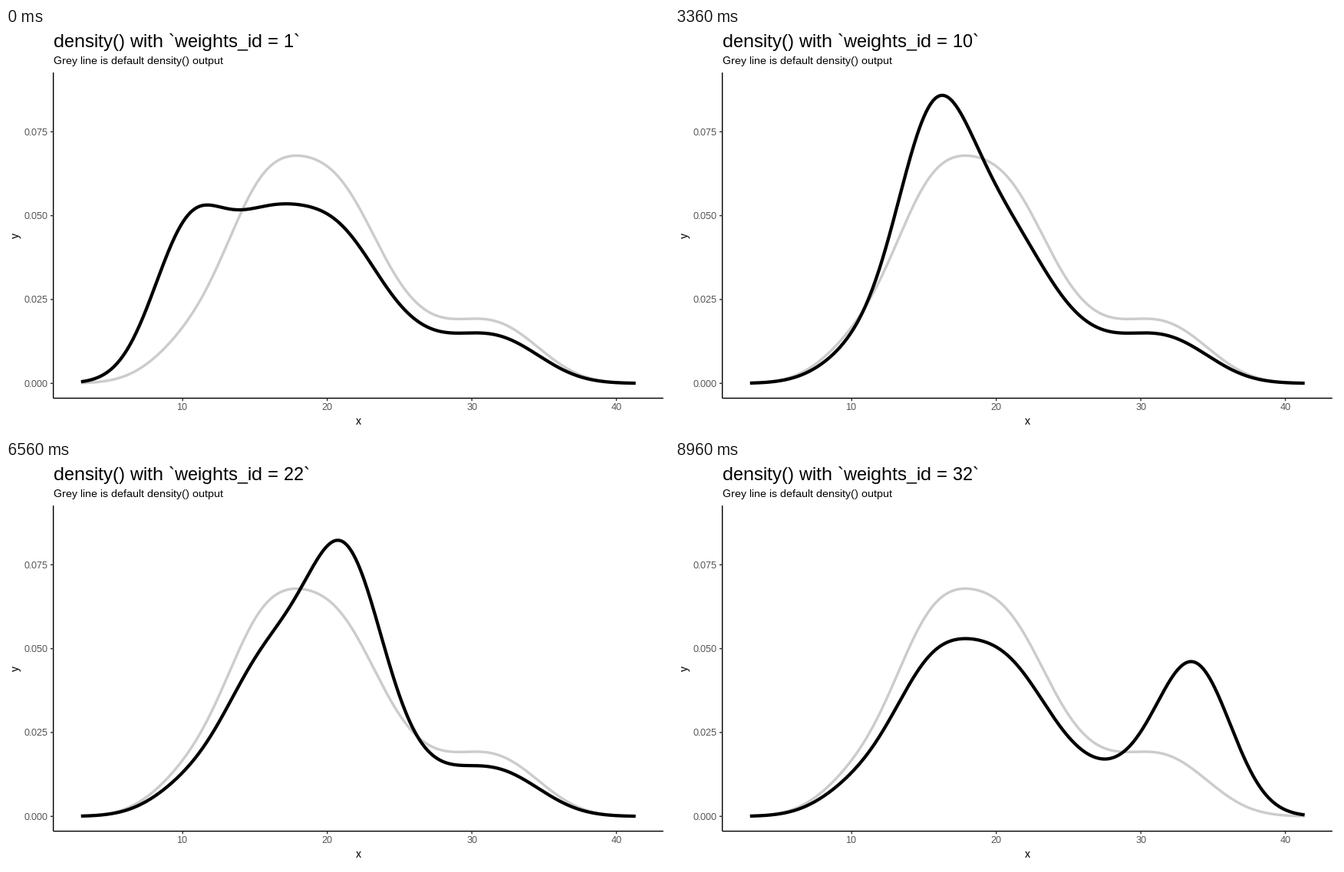
Animation, 864 px wide and 528 px high, one loop 9.6 s. Source, as a matplotlib script:

```python
import numpy as np
import matplotlib.pyplot as plt
from matplotlib.animation import FuncAnimation

W, H, DPI = 864, 528, 96
FRAMES, INTERVAL = 120, 80

# Whole-pixel letter spacing
plt.rcParams["font.family"] = "Liberation Sans"
plt.rcParams["text.hinting"] = "native"
plt.rcParams["text.hinting_factor"] = 1

# Panel edges in pixels, measured from the top left corner
LEFT, RIGHT, TOP, BOTTOM = 61.67, 856.67, 58.1, 482.6
Y_ZERO, Y_UNIT = 463.3, 4373

VALUES = np.array([
    10.4, 10.4, 13.3, 14.3, 14.7, 15.0, 15.2, 15.2, 15.5, 15.8, 16.4,
    17.3, 17.8, 18.1, 18.7, 19.2, 19.2, 19.7, 21.0, 21.0, 21.4, 21.4,
    21.5, 22.8, 22.8, 24.4, 26.0, 27.3, 30.4, 30.4, 32.4, 33.9])
COUNT = len(VALUES)
HEAVY = 10

# Rule-of-thumb bandwidth
q1, q3 = np.percentile(VALUES, [25, 75])
BW = 0.9 * min(VALUES.std(ddof=1), (q3 - q1) / 1.34) * COUNT ** -0.2

GRID = np.linspace(VALUES[0] - 3 * BW, VALUES[-1] + 3 * BW, 512)
KERNELS = np.exp(-0.5 * ((GRID[:, None] - VALUES) / BW) ** 2)
KERNELS /= BW * np.sqrt(2 * np.pi)

PAD = 0.05 * (GRID[-1] - GRID[0])
X_UNIT = (RIGHT - LEFT) / (GRID[-1] - GRID[0] + 2 * PAD)


def to_x(v):
    return LEFT + (v - GRID[0] + PAD) * X_UNIT


def to_y(v):
    return Y_ZERO - v * Y_UNIT


def pt(px):
    return px * 72 / DPI


def density(heavy_id=None):
    weights = np.ones(COUNT)
    if heavy_id:
        weights[heavy_id - 1] = HEAVY
    return KERNELS @ weights / weights.sum()


def switch(k):
    """Frame at which the title moves on to state k."""
    return min(4 * k + 2, 3 * k + 16)


def state_at(frame):
    return 1 + sum(switch(k) <= frame for k in range(2, COUNT + 1))


fig = plt.figure(figsize=(W / DPI, H / DPI), dpi=DPI, facecolor="white")
ax = fig.add_axes([0, 0, 1, 1])
ax.set_xlim(0, W)
ax.set_ylim(H, 0)
ax.axis("off")


def stroke(xs, ys, color, px):
    return ax.plot(xs, ys, color=color, lw=pt(px), solid_capstyle="butt",
                   solid_joinstyle="round", snap=False)[0]


def label(x, y, text, px, color="black", **kw):
    return ax.text(x, y, text, fontsize=pt(px), color=color,
                   va="baseline", **kw)


curve_x = to_x(GRID)
stroke(curve_x, to_y(density()), "#cccccc", 3.41)
curve = stroke(curve_x, to_y(density(1)), "black", 4.27)

# Axis lines, ticks and tick labels
THIN, TICK = 1.42, 3.67
stroke([LEFT, LEFT], [TOP, BOTTOM], "black", THIN)
stroke([LEFT, RIGHT], [BOTTOM, BOTTOM], "black", THIN)
for v in (0, 0.025, 0.05, 0.075):
    y = to_y(v)
    stroke([LEFT - TICK, LEFT], [y, y], "#333333", THIN)
    label(55, y + 4.3, f"{v:.3f}", 12, "#4d4d4d", ha="right")
for v in (10, 20, 30, 40):
    x = to_x(v)
    stroke([x, x], [BOTTOM, BOTTOM + TICK], "#333333", THIN)
    label(x, 498, str(v), 12, "#4d4d4d", ha="center")

label((LEFT + RIGHT) / 2, 517, "x", 14.67, ha="center")
label(17, (TOP + BOTTOM) / 2, "y", 14.67, ha="center",
      rotation=90, rotation_mode="anchor")
title = label(LEFT, 25, "", 24, ha="left")
label(LEFT, 47, "Grey line is default density() output", 14, ha="left")


def update(frame):
    # The curve jumps one frame ahead of the title
    curve.set_ydata(to_y(density(state_at(frame + 1))))
    title.set_text(f"density() with `weights_id = {state_at(frame)}`")
    return curve, title


anim = FuncAnimation(fig, update, frames=FRAMES, interval=INTERVAL,
                     repeat=True, repeat_delay=0)
plt.show()
```
